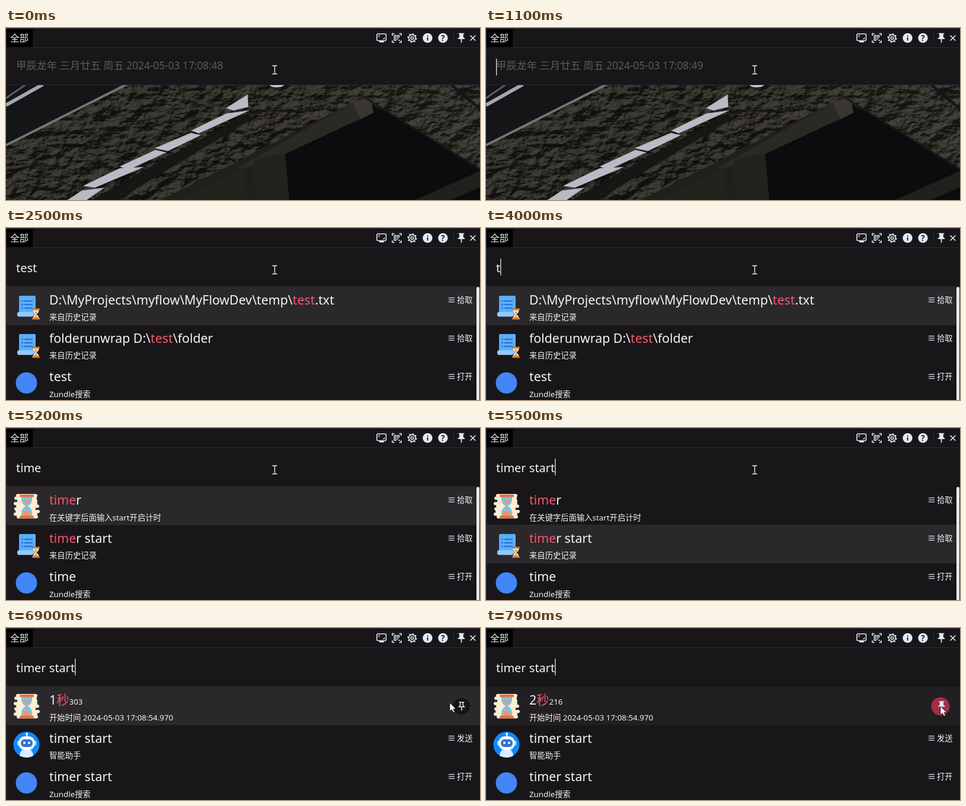
Animation, 800 px wide and 292 px high, one loop 8 s. Source, as an HTML page:

```html
<!DOCTYPE html>
<html lang="zh-CN">
<head>
<meta charset="utf-8">
<title>Launcher</title>
<style>
html, body { margin: 0; width: 100%; height: 100%; overflow: hidden; background: #181619; }
svg { display: block; }
text { font-family: "Noto Sans", "Noto Sans CJK SC", "Noto Sans CJK", sans-serif; fill: #f4f3f5; white-space: pre; }
.title { font-size: 21.333px; }
.small { font-size: 13.333px; }
.hit { fill: #f4566e; }
.line { fill: none; stroke: #e3eaf8; stroke-width: 1.6; }
.ink { fill: #e3eaf8; }
</style>
</head>
<body>
<svg id="stage" width="800" height="292" viewBox="0 0 800 292"></svg>
<script>
const LOOP = 8000, STEP = 100, ROW = 65, TOP = 99;
const raw = String.raw;
const pinFull = 'M16 9V4h1a1 1 0 0 0 0-2H7a1 1 0 0 0 0 2h1v5a3 3 0 0 1-3 3v2h6v7l1 1 1-1v-7h6v-2a3 3 0 0 1-3-3z';
const pinHole = 'M14 4v5c0 1.1.4 2.2 1 3H9c.6-.8 1-1.900 1-3V4z';

const rect = (x, y, w, h, fill, r = 0) =>
  `<rect x="${x}" y="${y}" width="${w}" height="${h}" rx="${r}" fill="${fill}"/>`;
const disc = (x, y, r, fill) => `<circle cx="${x}" cy="${y}" r="${r}" fill="${fill}"/>`;
const poly = (points, fill) => `<polygon points="${points}" fill="${fill}"/>`;
const text = (x, y, cls, str, extra = '') => `<text x="${x}" y="${y}" class="${cls}" ${extra}>${str}</text>`;
const pin = (x, y, s, d) =>
  `<path class="ink" fill-rule="evenodd" transform="translate(${x} ${y}) scale(${s}) translate(-12 -12)" d="${d}"/>`;
const mark = s => s.replace(/\[(.*?)\]/g, '<tspan class="hit">$1</tspan>');

// Icons are placed relative to the top left of their row.
function hourglass() {
  const bars = [[17, 36], [14, 38], [19, 34], [13, 40], [17, 39], [14, 36], [16, 41], [13, 40], [18, 36]];
  return bars.map(([x, w], i) => rect(x, 13 + i * 4.5, w, 5.4, '#fdeed6', 2.6)).join('') +
    '<path d="M26 17H44V23Q44 29 37 33.500Q44 38 44 45V51H26V45Q26 38 33 33.500Q26 29 26 23Z" fill="#7cc4e6"/>' +
    '<path d="M30 24H40Q39 28 35.500 31V41Q42 44 42 51H28Q28 44 34.500 41V31Q31 28 30 24Z" fill="#f4935f"/>' +
    rect(23, 14, 24, 4.5, '#e2723f', 1.5) + rect(23, 50, 24, 4.5, '#e2723f', 1.5);
}

function history() {
  const lines = [25, 31, 37].map(y => rect(26, y - 1, 3, 2, '#1f6fd0') + rect(31, y - 1, 14, 2, '#1f6fd0')).join('');
  return rect(22, 16, 28, 34, '#5cadfa', 2) + lines +
    rect(19, 43.5, 27, 8, '#93cbff', 3) +
    '<path d="M45.500 40H55.500V42Q55 45 51.500 47.500Q55 50 55.500 53V55H45.500V53Q46 50 49.500 47.500Q46 45 45.500 42Z" fill="#ffe3b5"/>' +
    '<path d="M47.500 43H53.500L50.500 47.500L53.500 54H47.500L50.500 47.500Z" fill="#f0a030"/>' +
    rect(44, 37.5, 13, 3, '#c8773d', 1) + rect(44, 53.5, 13, 3, '#c8773d', 1);
}

function robot() {
  return disc(34.5, 34, 22, '#1088fb') +
    '<path d="M23 53Q24 41 34.500 41Q45 41 46 53Q35 59 23 53Z" fill="#dcecff"/>' +
    rect(34, 15, 2, 7, '#fff') + disc(35, 16, 2.2, '#fff') +
    rect(19, 27, 32, 9, '#b9dcff', 3) + rect(22, 20, 26, 23, '#fff', 9) +
    rect(25, 25, 20, 13, '#2f74c9', 6) + disc(31, 31, 2, '#fff') + disc(39, 31, 2, '#fff');
}

const icons = {
  hourglass: hourglass(),
  history: history(),
  robot: robot(),
  chat: disc(34.5, 34, 19.5, '#35a0de'),
  editor: rect(13, 13, 43, 42, '#ee486c'),
  search: disc(34.5, 34, 18, '#4285f4')
};

function label(str, y) {
  const x = 788 - str.length * 13.5;
  const sign = str === '固定' ? pin(x - 8, y + 23, .56, pinFull + pinHole)
    : [19.5, 23, 26.5].map(dy => rect(x - 14, y + dy - .6, 10, 1.2, '#e3eaf8')).join('');
  return `<g class="label">${sign}${text(x, y + 28, 'small', str)}</g>`;
}

function row([icon, title, sub, action], i) {
  const y = TOP + i * ROW;
  const drop = /\w/.test(sub) ? 58 : 57; // Latin letters make the line box taller
  return `<g transform="translate(0 ${y})">${icons[icon]}</g>` +
    text(73, y + 31.4, 'title', mark(title)) + text(73, y + drop, 'small', sub) + label(action, y);
}

const past = '来自历史记录', find = 'Zundle搜索';
const timerRows = q => [
  ['hourglass', `[${q}]${'timer'.slice(q.length)}`, '在关键字后面输入start开启计时', '拾取'],
  ['history', `[${q}]${'timer'.slice(q.length)} start`, past, '拾取'],
  ['search', q, find, '打开']
];
const lists = {
  te: [
    ['chat', '[Te]ssoran', raw`C:\Users\nolva\Desktop\Telegram.lnk`, '打开文件'],
    ['editor', 'Li[te]frij SILO 2023.3.2',
      raw`C:\ProgramData\Microsoft\Windows\Start Menu\Programs\JetBrains\IntelliJ IDEA 2023.3.2.lnk`, '打开文件'],
    ['history', raw`folderunwrap Z:\media\ma[te]rial\龟龟`, past, '拾取']
  ],
  test: [
    ['history', raw`D:\MyProjects\myflow\MyFlowDev\temp\[test].txt`, past, '拾取'],
    ['history', raw`folderunwrap D:\[test]\folder`, past, '拾取'],
    ['search', 'test', find, '打开']
  ],
  ti: timerRows('ti'),
  time: timerRows('time'),
  run: [
    ['hourglass', '', '', '固定'],
    ['robot', 'timer start', '智能助手', '发送'],
    ['search', 'timer start', find, '打开']
  ]
};

function photo() {
  const tiles = [
    '104,292 128,276 166,271 136,292', '130,268 192,238 233,236 150,271', '192,235 252,207 271,211 206,241',
    '251,204 312,178 329,182 273,209', '313,174 372,145 411,140 325,179', '371,136 408,113 409,134 384,140'
  ];
  return `<g clip-path="url(#view)">${rect(0, 97, 800, 195, 'url(#roof)')}` +
    poly('135,292 410,141 420,97 800,97 800,292', 'url(#wood)') +
    '<rect y="97" width="800" height="195" filter="url(#grain)" opacity=".6"/>' +
    poly('0,97 200,97 0,198', '#131516') +
    '<path d="M0 131L62 96" stroke="#a4a7b0" stroke-width="6"/><path d="M0 119L32 97" stroke="#5d6066" stroke-width="3"/>' +
    '<path d="M0 199L205 95" stroke="#747574" stroke-width="4"/>' +
    poly('145,292 232,242 410,143 412,156 215,276 190,292', '#171614') +
    poly('400,222 604,116 475,225 418,292 262,292', '#211f1b') +
    poly('470,214 607,122 800,238 800,292 475,292', '#0c0c0f') +
    poly('390,238 604,116 616,120 620,144 475,212 400,240', '#2a2923') +
    poly('585,126 616,118 620,144 598,155', '#38362e') +
    poly('290,292 400,238 408,292', '#24221d') +
    poly('418,222 471,213 478,292 420,292', '#24221e') +
    poly('690,292 800,243 800,270 750,292', '#22201c') +
    '<path d="M604 117L800 240" stroke="#17161a" stroke-width="3"/><path d="M752 97L800 137" stroke="#15151a" stroke-width="5"/>' +
    tiles.map(p => poly(p, '#b9bac6')).join('') +
    '<ellipse cx="457" cy="97" rx="12" ry="3.500" fill="#c3d0e2"/></g>' +
    rect(0, 96, 800, 1, '#2b2a2d');
}

function toolbar() {
  const brackets = (x, y, w, h, n) =>
    `<path class="line" d="M${x} ${y + n}v${-n}h${n}M${x + w - n} ${y}h${n}v${n}M${x + w} ${y + h - n}v${n}h${-n}M${x + n} ${y + h}h${-n}v${-n}"/>`;
  const cells = [[655, 12.5], [660.5, 12.5], [655, 18]]
    .map(([x, y]) => `<rect class="line" style="stroke-width:1.3" x="${x}" y="${y}" width="3.200" height="3.200"/>`).join('') +
    rect(660, 17.5, 2, 2, '#e3eaf8') + rect(662.5, 20, 2, 2, '#e3eaf8');
  return rect(0, 0, 800, 1, '#2e2d30') + rect(0, 33, 800, 1, '#2d2c2f') + rect(0, 0, 1, 292, '#2d2c2f') +
    rect(1, 2, 44, 31, '#000') + text(7, 22.5, '', '全部', 'font-size="15.500"') +
    '<rect class="line" x="626" y="10" width="15.500" height="11.500" rx="1.500"/>' + rect(630, 22, 8, 2.4, '#e3eaf8') +
    '<path class="line" style="stroke-width:1.1" d="M629 15.500v-2.500h2.500M638.500 16v2.500H636"/>' +
    brackets(652, 9.5, 15, 15, 3.5) + cells +
    '<g class="line" transform="translate(685.500 17)"><circle r="5.600"/><circle r="2.300"/>' +
    '<circle r="7.100" stroke-width="2" stroke-dasharray="2.600 2.976"/></g>' +
    disc(711.5, 17, 8.2, '#e3eaf8') + rect(710.6, 16, 1.9, 5.5, '#181619') + rect(710.6, 12.5, 1.9, 2, '#181619') +
    disc(737.5, 17, 8.2, '#e3eaf8') +
    text(737.5, 22, '', '?', 'font-size="13.500" font-weight="700" text-anchor="middle" style="fill:#181619"') +
    rect(755, 8, 1, 18, '#333236') + pin(768.5, 17, .82, pinFull) +
    '<path class="line" d="M783.500 12.500l9 9m0-9l-9 9"/>';
}

const stage = document.getElementById('stage');
stage.innerHTML = `<defs>
  <clipPath id="view"><rect y="97" width="800" height="195"/></clipPath>
  <linearGradient id="roof" x2="1" y2=".4"><stop stop-color="#30302e"/><stop offset=".3" stop-color="#2a2925"/><stop offset=".6" stop-color="#2c2a25"/></linearGradient>
  <linearGradient id="wood" x2="1"><stop stop-color="#22211d"/><stop offset=".4" stop-color="#2a2922"/><stop offset="1" stop-color="#35352e"/></linearGradient>
  <filter id="grain" x="0" y="0" width="1" height="1" color-interpolation-filters="sRGB">
    <feTurbulence type="fractalNoise" baseFrequency=".035 .055" numOctaves="4" seed="4"/>
    <feDiffuseLighting surfaceScale="14" lighting-color="#504d43"><feDistantLight azimuth="235" elevation="38"/></feDiffuseLighting>
  </filter>
</defs>` + rect(0, 0, 800, 292, '#181619') + toolbar() +
  `<rect id="pick" x="1" width="799" height="66"/>
  <g id="photo">${photo()}</g>` +
  Object.entries(lists).map(([k, rows]) => `<g id="list-${k}">${rows.map(row).join('')}</g>`).join('') +
  `<g id="clock">${text(73, 130, 'title', '')}${text(73, 157, 'small', '开始时间 2024-05-03 17:08:54.970')}</g>
  <g id="button"><circle cx="769" cy="133" r="14" fill="#151416"/><circle id="ripple" cx="767" cy="133" fill="#a32e46"/>
    <g id="hollow">${pin(769, 133, .78, pinFull + pinHole)}</g><g id="solid">${pin(769, 132, .78, pinFull)}</g></g>
  <rect id="bar" x="794" y="100" width="5" height="200" rx="2.500" fill="#e9e8ea"/>` +
  text(17, 70.4, '', '', 'id="hint" font-size="17.300" style="fill:#5c5b5e"') +
  `<rect id="range" y="54" height="27" fill="#2c68b4"/>` +
  text(17, 75, '', '', 'id="query" font-size="20"') +
  `<rect id="caret" y="52" width="1.200" height="28.500" fill="#f4f3f5"/>
  <path id="beam" d="M-4 -7h3l1 1 1-1h3M0 -6V6M-4 7h3l1-1 1 1h3" fill="none" stroke="#f2f2f2" stroke-width="1.300"/>
  <path id="arrow" d="M0 0V14.500L3.400 11.300L5.800 16.500L8.300 15.400L6 10.400H10.500Z" fill="#fff" stroke="#111" stroke-width=".8"/>`;

const $ = id => document.getElementById(id);
const show = (id, on) => { $(id).style.display = on ? '' : 'none'; };
const set = (id, attrs) => { for (const k in attrs) $(id).setAttribute(k, attrs[k]); };
const pen = document.createElement('canvas').getContext('2d');
pen.font = '20px "Noto Sans", "Noto Sans CJK SC", sans-serif';
const edge = s => 17 + pen.measureText(s).width;

// Each step changes part of the state; `key` restarts the caret blink.
const steps = [
  [0, { query: '', list: '', row: 0, range: 0, key: 100 }],
  [1400, { query: 't', key: 1400 }],
  [1500, { query: 'te', list: 'te', key: 1500 }],
  [1600, { query: 'tes', key: 1600 }],
  [1700, { query: 'test', key: 1700 }],
  [1900, { list: 'test' }],
  [3100, { range: 1 }], [3200, { range: 2 }], [3300, { range: 3 }], [3400, { range: 4 }],
  [3900, { query: 't', range: 0, key: 3900 }],
  [4100, { query: 'ti', key: 4100 }],
  [4200, { list: 'ti' }],
  [4500, { query: 'tim', key: 4500 }],
  [4700, { query: 'time', key: 4700 }],
  [4800, { list: 'time' }],
  [5300, { row: 1 }],
  [5500, { query: 'timer start', key: 5500 }],
  [5600, { list: 'run', row: 0 }]
];

const path = [[6300, 453.5, 71], [6400, 466, 76], [6500, 510, 90], [6600, 579, 108], [6700, 664, 122],
  [6800, 722, 126], [6900, 749, 127], [7200, 760, 130], [7500, 767, 133]];
function pointer(t) {
  const i = path.findIndex(p => p[0] > t);
  if (i === 0) return path[0].slice(1);
  if (i < 0) return path.at(-1).slice(1);
  const [a, b] = [path[i - 1], path[i]], f = (t - a[0]) / (b[0] - a[0]);
  return [a[1] + f * (b[1] - a[1]), a[2] + f * (b[2] - a[2])];
}

function draw(t) {
  const s = {};
  for (const [at, change] of steps) if (at <= t) Object.assign(s, change);

  show('photo', !s.list);
  for (const k in lists) show('list-' + k, k === s.list);
  show('bar', ['test', 'ti', 'time'].includes(s.list));

  $('hint').textContent = s.query ? '' : `甲辰龙年 三月廿五 周五 2024-05-03 17:08:${t < 600 ? 48 : 49}`;
  $('query').textContent = s.query;
  const left = edge(s.query.slice(0, s.query.length - s.range)), right = edge(s.query);
  set('range', { x: left, width: right - left });
  set('caret', { x: right });
  show('caret', !s.range && Math.floor((t - s.key) / 500) % 2 === 0);

  const hover = t >= 6700, press = t >= 7700;
  show('pick', s.list);
  set('pick', { y: TOP + s.row * ROW, fill: press ? '#211f22' : '#2a282b' });

  show('clock', t >= 5800);
  const ms = Math.max(0, Math.round(1303 + (t - 6900) * .913));
  $('clock').firstElementChild.innerHTML = Math.floor(ms / 1000) +
    `<tspan class="hit">秒</tspan><tspan class="small">${String(ms % 1000).padStart(3, '0')}</tspan>`;

  $('list-run').querySelector('.label').style.display = hover ? 'none' : '';
  show('button', hover);
  show('hollow', !press);
  show('solid', press);
  set('ripple', { r: press ? Math.min(15.5, 6 + (t - 7700) * .048) : 0 });

  const [x, y] = pointer(t), inList = y > 98;
  show('beam', !inList);
  show('arrow', inList);
  set(inList ? 'arrow' : 'beam', { transform: `translate(${x} ${y})` });
}

const start = performance.now();
let last = -1;
function tick() {
  const t = Math.floor((performance.now() - start) % LOOP / STEP) * STEP;
  if (t !== last) draw(last = t);
  requestAnimationFrame(tick);
}
tick();
</script>
</body>
</html>
```
